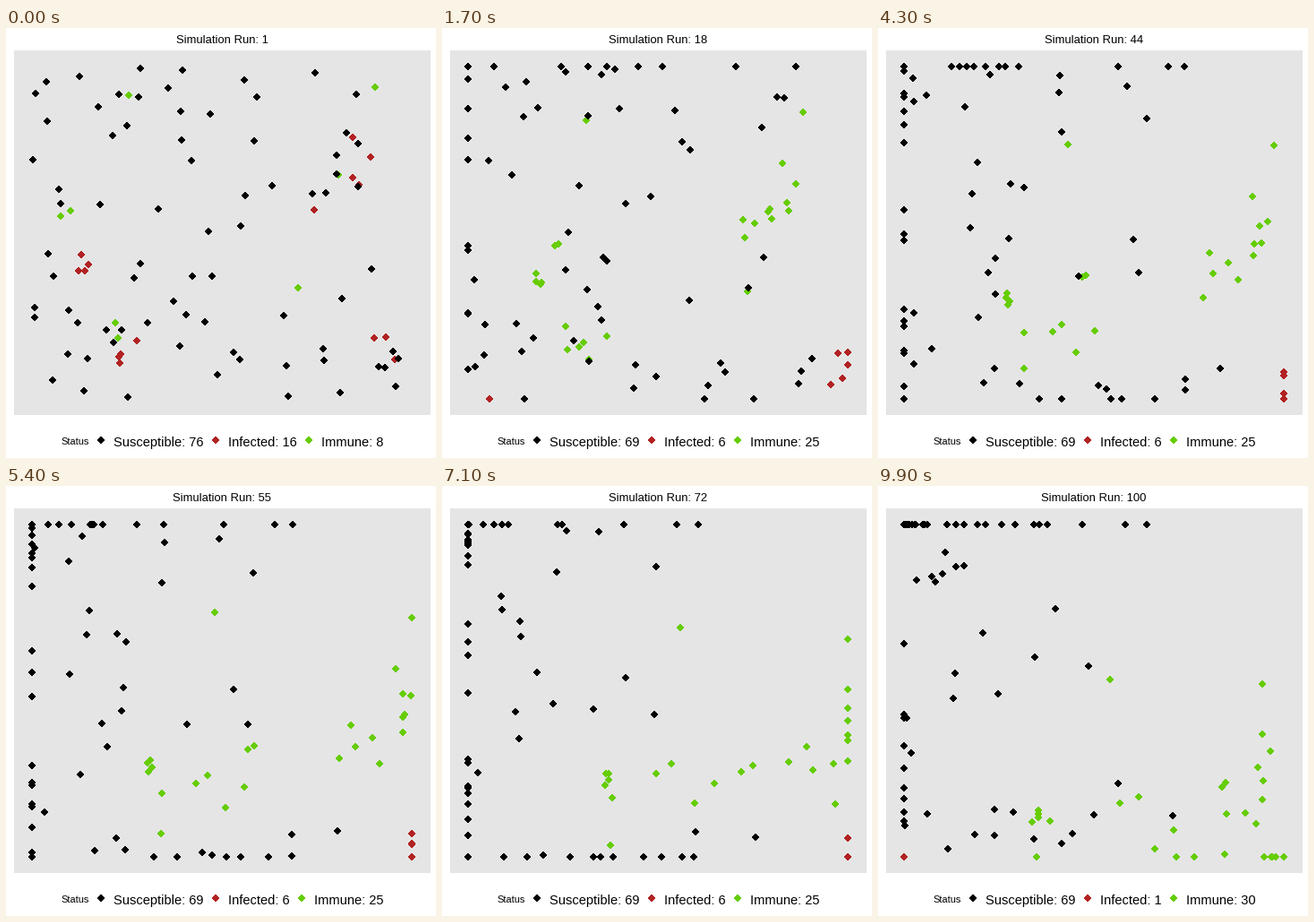
A matplotlib script that plays this animation: 480 by 480 pixels, repeating every 10000 ms.

```python
import matplotlib.pyplot as plt
import numpy as np
from matplotlib.animation import FuncAnimation
from matplotlib.path import Path

SIZE, FRAMES, STEP_MS = 480, 100, 100
LEFT, RIGHT, TOP, BOTTOM = 29, 453, 43, 414
CRUISE = 55  # steps in which an agent covers its drift
LONERS = 69  # agents that never fall ill
NEVER = FRAMES + 1
COLORS = np.array(["black", "#B22222", "#66CD00"])
NAMES = ["Susceptible", "Infected", "Immune"]

rng = np.random.default_rng(12)

# immune, infected, exposed; centre, spread; drift; first recovery
FLOCKS = [
    (1, 5, 4, 371 + 164j, 22, 60 + 95j, 6),
    (0, 4, 0, 85 + 267j, 7, 75 + 42j, 4),
    (0, 4, 0, 108 + 364j, 17, 114 - 10j, 9),
    (0, 3, 2, 412 + 366j, 18, 90 + 45j, 76),
    (0, 0, 1, 87 + 405j, 0, -110 + 700j, NEVER),
    (2, 0, 0, 60 + 213j, 12, 228 + 90j, 0),
    (2, 0, 0, 128 + 328j, 18, 53 + 5j, 0),
    (1, 0, 0, 326 + 290j, 0, 47 + 14j, 0),
    (1, 0, 0, 412 + 66j, 0, 48 + 82j, 0),
    (1, 0, 0, 137 + 75j, 0, 98 + 67j, 0),
]


def wall(p):
    return np.clip(p.real, LEFT, RIGHT) + 1j * np.clip(p.imag, TOP, BOTTOM)


def scatter(n, spread):
    return rng.normal(0, spread, n) + 1j * rng.normal(0, spread, n)


def flock(immune, infected, exposed, centre, spread, drift, first_well):
    """Start, drift, and the steps of infection and recovery."""
    n = immune + infected + exposed
    i = np.arange(n)
    ill = np.where(i < immune + infected, 0, 1 + i)
    well = np.where(i < immune, 0, first_well + i)
    return centre + scatter(n, spread), drift + scatter(n, spread), ill, well


def loners(n):
    """Spread over the field, drifting left and away from the lower part."""
    x = rng.uniform(LEFT, 440, n)
    y = TOP + (BOTTOM - TOP) * rng.random(n) ** 1.2
    sink = np.clip((y - 280) / 60, 0, 1)
    drift = -110 + 1j * (-75 + 120 * sink) + scatter(n, 35)
    never = np.full(n, NEVER)
    return x + 1j * y, drift, never, never


def headings(start):
    """Turn of every agent's course at each step, as unit complex numbers."""
    step = np.arange(FRAMES)[:, None]
    early = np.where(start.imag < 265, start.real * 2 / 7, 0)
    angle = early * np.clip(1 - step / 18, 0, 1)
    angle = angle + 80 * np.clip((step - 70) / 9, 0, 1)
    return np.exp(1j * np.radians(angle))


def walk(start, drift):
    """Positions per frame; walls stop an agent but keep its course."""
    turn = headings(start)
    speed = drift / turn[:CRUISE].sum(axis=0)
    pos, track = wall(start), []
    for k in range(FRAMES):
        track.append(np.column_stack([pos.real, pos.imag]).round())
        pos = wall(pos + speed * turn[k])
    return track


groups = [flock(*row) for row in FLOCKS] + [loners(LONERS)]
start, drift, ill_at, well_at = map(np.concatenate, zip(*groups))
track = walk(start, drift)

plt.rcParams["font.family"] = "Liberation Sans"
fig = plt.figure(figsize=(SIZE / 72, SIZE / 72), dpi=72, facecolor="white")
ax = fig.add_axes([0, 0, 1, 1])
ax.set(xlim=(0, SIZE), ylim=(SIZE, 0))
ax.axis("off")
ax.add_patch(plt.Rectangle((9, 25), 465, 407, fc="#E5E5E5", ec="none",
                           antialiased=False))

DIAMOND = Path([(0, 1), (1, 0), (0, -1), (-1, 0), (0, 1)], closed=True)


def dots(points, colors):
    return ax.scatter(*np.transpose(points), s=49, marker=DIAMOND, c=colors,
                      linewidths=0, antialiased=False, clip_on=False)


def label(x, y, size, text="", **kw):
    return ax.text(x, y, text, fontsize=size, va="baseline", **kw)


title = label(241, 17, 12.95, ha="center")
heading = label(61, 465, 11, "Status")
swarm = dots(track[0], "black")
keys = dots([(106, 460), (234, 460), (338, 460)], COLORS)
entries = [label(0, 467, 14.6) for _ in NAMES]


def draw(frame):
    state = (frame >= ill_at).astype(int) + (frame >= well_at)
    swarm.set_offsets(track[frame])
    swarm.set_facecolors(COLORS[state])
    title.set_text(f"Simulation Run: {frame + 1}")

    counts = [str(n) for n in np.bincount(state, minlength=3)]
    left = 61 - 4 * (len("".join(counts)) - 5)
    heading.set_x(left)
    key_x = [left + 45, left + 173, left + 261 + 8 * len(counts[1])]
    keys.set_offsets([(x, 460) for x in key_x])
    for entry, name, count, x in zip(entries, NAMES, counts, key_x):
        entry.set_text(f"{name}: {count}")
        entry.set_x(x + 13.5)
    return [swarm, title, heading, keys, *entries]


anim = FuncAnimation(fig, draw, frames=FRAMES, interval=STEP_MS, repeat=True,
                     repeat_delay=0, blit=False)
plt.show()
```
